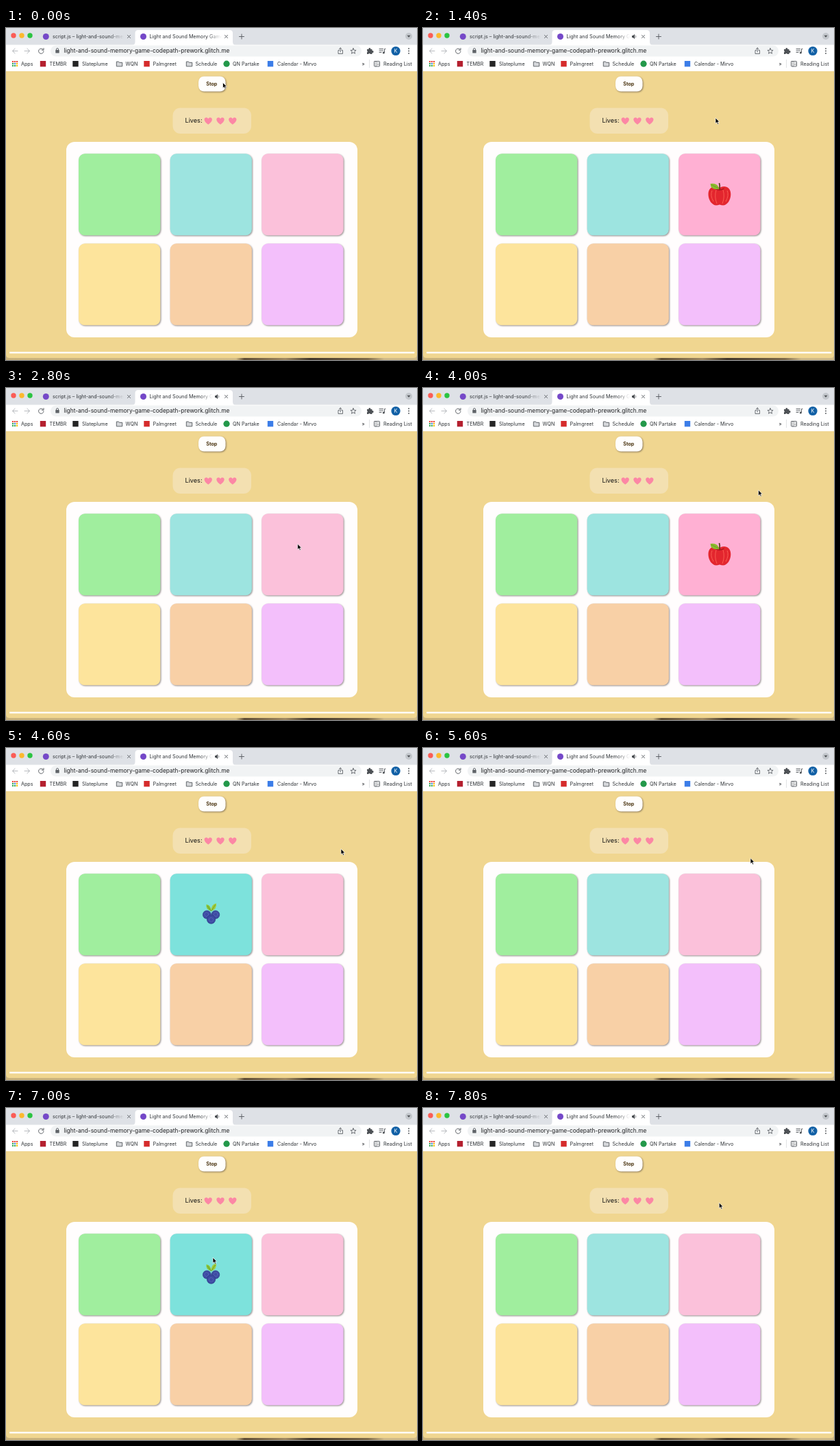
Animation, 600 px wide and 484 px high, one loop 8000 ms. Source, as an HTML page:

```html
<!DOCTYPE html>
<html lang="en">
<head>
<meta charset="utf-8">
<title>Memory game</title>
<style>
  html, body { margin: 0; width: 100%; height: 100%; overflow: hidden; background: #f0d690; }
  svg { display: block; }
  text { font-family: Inter, Roboto, sans-serif; font-size: 7.2px; fill: #2f3337; }
  .line { fill: none; stroke: #5f6368; stroke-width: 1; stroke-linecap: round; stroke-linejoin: round; }
  .shadow { filter: drop-shadow(1.2px 1.4px 1px rgba(60, 50, 50, .55)); }
</style>
</head>
<body>
<svg width="600" height="484" viewBox="0 0 600 484">
  <defs>
    <linearGradient id="fade">
      <stop offset=".8" stop-color="#fff"/><stop offset="1" stop-color="#fff" stop-opacity="0"/>
    </linearGradient>
    <linearGradient id="desk">
      <stop offset="0" stop-color="#c9b27c"/><stop offset=".56" stop-color="#d3bd88"/>
      <stop offset=".58" stop-color="#5d4c35"/><stop offset=".68" stop-color="#a18b64"/>
      <stop offset=".74" stop-color="#41372a"/><stop offset=".88" stop-color="#7d6a4b"/>
      <stop offset=".92" stop-color="#d0bb8a"/>
    </linearGradient>
    <mask id="fadeLeft"><rect x="66" width="106" height="24" fill="url(#fade)"/></mask>
    <mask id="fadeRight"><rect id="titleSpan" x="207" width="108" height="24" fill="url(#fade)"/></mask>
    <g id="close"><path class="line" d="M-2-2 2 2M2-2-2 2"/></g>
    <g id="folder"><path class="line" d="M-4.2 3.2V-3.2H-1L0-2H4.2V3.2Z" style="fill:#d5d7da"/></g>
    <path id="heart" fill="#fc87a5" d="M0 5.2C-3.2 2.7-5.7.6-5.7-2C-5.7-5.4-1.5-6.1 0-3.1C1.5-6.1 5.7-5.4 5.7-2C5.7.6 3.2 2.7 0 5.2Z"/>
  </defs>

  <!-- desktop and page -->
  <rect width="600" height="484" fill="url(#desk)"/>
  <path d="M0 62H600V476Q600 481 595 481H5Q0 481 0 476Z" fill="#f0d690"/>
  <rect x="5" y="472" width="591.5" height="2.4" rx="1" fill="#fffdf8"/>

  <!-- tab strip -->
  <rect width="600" height="25" fill="#dee1e6"/>
  <circle cx="11" cy="11" r="3.7" fill="#fb5c55"/>
  <circle cx="23" cy="11" r="3.7" fill="#fcb92d"/>
  <circle cx="35" cy="11" r="3.7" fill="#2bc440"/>
  <path d="M184 25Q188.500 25 188.500 20V7.500Q188.500 3 193 3H326.500Q331 3 331 7.500V20Q331 25 335.500 25Z" fill="#fff"/>
  <circle cx="58.300" cy="12.500" r="4.500" fill="#7548c8"/>
  <circle cx="200.500" cy="12.500" r="4.500" fill="#7548c8"/>
  <g mask="url(#fadeLeft)"><text x="68" y="15">script.js – light-and-sound-memory</text></g>
  <g mask="url(#fadeRight)"><text x="209.500" y="15">Light and Sound Memory Game</text></g>
  <g id="speaker">
    <path d="M305 11H306.700L309 9V16L306.700 14H305Z" fill="#4d5155"/>
    <path class="line" d="M310.300 11Q311.500 12.500 310.300 14" style="stroke-width:.8"/>
  </g>
  <use href="#close" x="179.500" y="12.500"/>
  <use href="#close" x="321.500" y="12.500"/>
  <path class="line" d="M340.500 12.500H347.500M344 9V16"/>
  <circle cx="588" cy="12" r="5" fill="#c3c7cc"/>
  <path d="M585.500 10.700H590.500L588 13.700Z" fill="#4d5155"/>

  <!-- toolbar -->
  <rect y="24.500" width="600" height="38.500" fill="#fff"/>
  <rect x="65" y="25.500" width="454" height="16" rx="8" fill="#f1f3f4"/>
  <path class="line" d="M17 33.500H9.500M13 30L9.500 33.500L13 37M27 33.500H34.500M31 30L34.500 33.500L31 37" style="stroke:#b9bcc0"/>
  <path class="line" d="M54.300 31.500A3.700 3.700 0 1 0 55 34M55 29.500V32.200H52.300"/>
  <rect x="72.300" y="32" width="5.400" height="4.500" rx=".6" fill="#5f6368"/>
  <path class="line" d="M73.500 32V31A1.500 1.500 0 0 1 76.500 31V32" style="stroke-width:.9"/>
  <text x="84.500" y="36.300" style="font-size:8.4px;fill:#202124">light-and-sound-memory-game-codepath-prework.glitch.me</text>
  <path class="line" d="M486.500 32.500H485V37.500H491.500V32.500H490M488.200 35V29M486.300 30.800L488.200 29L490.100 30.800" style="stroke-width:.9"/>
  <path id="star" class="line" style="stroke-width:.9"/>
  <path d="M527 31H529.400A1.500 1.500 0 1 1 532.300 31H534.500V33.200A1.500 1.500 0 1 1 534.500 36V38H531.800A1.400 1.400 0 0 0 529.200 38H527V35.600A1.500 1.500 0 0 0 527 33Z" fill="#4d5155"/>
  <path class="line" d="M545 30.500H550.500M545 33H550.500M545 35.500H548M552.500 35.500V30.500H554"/>
  <circle cx="551.300" cy="36" r="1.500" fill="#4d5155"/>
  <circle cx="569" cy="33.500" r="6.600" fill="#1261a6"/>
  <text x="569" y="36" text-anchor="middle" style="fill:#fff">K</text>
  <path d="M588 30V30M588 33.500V33.500M588 37V37" stroke="#4d5155" stroke-width="1.800" stroke-linecap="round"/>

  <!-- bookmarks -->
  <g id="bookmarks"></g>
  <path d="M530.500 46V58" stroke="#d5d7da" stroke-width=".7"/>
  <rect class="line" x="537.500" y="48.500" width="8" height="7.500" rx=".7"/>
  <path class="line" d="M540 48.500V56M542 51H544M542 53.500H544" style="stroke-width:.8"/>

  <!-- game -->
  <rect class="shadow" x="281" y="70.500" width="39.500" height="22" rx="8" fill="#fffefc"/>
  <text x="300.300" y="84.200" text-anchor="middle" style="font-weight:700;fill:#4b3511">Stop</text>
  <rect x="243.500" y="116.500" width="114.500" height="37.500" rx="11" fill="#f3e0b1"/>
  <text x="261.500" y="138.200" style="font-size:9.1px;fill:#111">Lives:</text>
  <use href="#heart" x="295.200" y="135.500"/>
  <use href="#heart" x="313" y="135.500"/>
  <use href="#heart" x="330.800" y="135.500"/>
  <rect x="88" y="166" width="425" height="285" rx="12" fill="#fffdfd"/>
  <g id="tiles"></g>

  <g id="apple">
    <path d="M433 233C427 228.500 416.500 231 416.500 242C416.500 251 422 258.500 428 258.500Q430.500 258.500 433 257.500Q435.500 258.500 438 258.500C444 258.500 449.300 251 449.300 242C449.300 231 439 228.500 433 233Z" fill="#e3262e"/>
    <path d="M422 237Q419 244 424 253M428 236Q425 246 429 256M438 236Q441 246 437 256M444 237Q447 244 442 253" fill="none" stroke="#fa5a50" stroke-width="1"/>
    <path d="M427 234.500Q433 238 439.500 234" fill="none" stroke="#9e1720" stroke-width="1.300"/>
    <path d="M433 235.500Q433.800 230 432.500 226" fill="none" stroke="#57341c" stroke-width="1.700"/>
    <path d="M432.500 234.500Q420 237 419.500 227Q430 225 432.500 234.500Z" fill="#8dbb2e"/>
    <path d="M421 228.500L431 233.500" stroke="#5d8d20" stroke-width=".7"/>
  </g>
  <g id="berries">
    <path d="M299.500 238Q291 235 292.500 228Q299.500 229 299.500 238Z" fill="#8cc63b"/>
    <path d="M299.500 238Q299 228 307 226.500Q308 235 299.500 238Z" fill="#a5cc3a"/>
    <path d="M294 230L299.500 238L305.500 228.500" fill="none" stroke="#4d8b2c" stroke-width=".7"/>
    <g fill="#3d4ba3" stroke="#2d367e" stroke-width=".6">
      <circle cx="293.300" cy="243" r="6"/><circle cx="305.800" cy="243" r="6"/><circle cx="299.500" cy="250" r="6.200"/>
    </g>
    <g fill="none" stroke="#7480c8" stroke-width=".8" stroke-dasharray="1 1">
      <circle cx="292.700" cy="242.500" r="2.800"/><circle cx="306.300" cy="242.500" r="2.800"/><circle cx="299.500" cy="250.300" r="3"/>
    </g>
  </g>
  <path id="cursor" d="M0 0V8.200L1.900 6.500L3.200 9.400L4.600 8.800L3.300 5.900H5.800Z" fill="#000" stroke="#fff" stroke-width=".7" stroke-linejoin="round"/>
</svg>

<script>
const LOOP = 8000, STEP = 200;
const $ = id => document.getElementById(id);

function add(parent, tag, attrs, content = "") {
  const el = document.createElementNS("http://www.w3.org/2000/svg", tag);
  for (const key in attrs) el.setAttribute(key, attrs[key]);
  el.textContent = content;
  parent.append(el);
  return el;
}

// Bookmark bar: label, text x, icon centre x, icon kind, colour
const bar = $("bookmarks");
[
  ["Apps", 22], ["TEMBR", 63.5, 54, "square", "#b4202f"],
  ["Slateplume", 111, 101.5, "square", "#252525"], ["WQN", 174.5, 165.5, "folder"],
  ["Palmgreet", 214.5, 205.5, "square", "#d52b2b"], ["Schedule", 276.5, 267.5, "folder"],
  ["QN Partake", 331, 322, "circle", "#23984a"],
  ["Calendar - Mirvo", 396, 386, "square", "#3c7de8"],
  ["»", 519.5], ["Reading List", 551],
].forEach(([label, x, icon, kind, fill]) => {
  add(bar, "text", { x, y: 54.8 }, label);
  if (kind === "folder") add(bar, "use", { href: "#folder", x: icon, y: 52.3 });
  if (kind === "circle") add(bar, "circle", { cx: icon, cy: 52.2, r: 4.6, fill });
  if (kind === "square") add(bar, "rect", { x: icon - 4.2, y: 48, width: 8.4, height: 8.4, fill });
});
["#e94235", "#e94235", "#e94235", "#34a853", "#4285f4", "#fbbc05", "#34a853", "#34a853", "#fbbc05"]
  .forEach((fill, i) => add(bar, "rect", {
    x: 9 + i % 3 * 3, y: 48 + Math.floor(i / 3) * 3, width: 2.1, height: 2.1, fill }));

$("star").setAttribute("d", "M" + Array.from({ length: 10 }, (_, i) => {
  const r = i % 2 ? 1.9 : 4.3, a = i * Math.PI / 5 - Math.PI / 2;
  return [507 + r * Math.cos(a), 33.8 + r * Math.sin(a)].map(n => n.toFixed(2));
}).join("L") + "Z");

const tiles = ["#a0ee9e", "#9de4e0", "#fbc1da", "#fde49c", "#f8d0a6", "#f3bffb"]
  .map((fill, i) => add($("tiles"), "rect", {
    class: "shadow", x: 106 + i % 3 * 133.6, y: i < 3 ? 183.3 : 314.3,
    width: 119.3, height: 119, rx: 9, fill }));

// Lit intervals in ms
const keys = [
  { tile: tiles[2], fruit: $("apple"), off: "#fbc1da", on: "#ffb0d3",
    lit: [[1000, 2000], [2400, 2800], [3400, 4200], [6000, 6400]] },
  { tile: tiles[1], fruit: $("berries"), off: "#9de4e0", on: "#7de2dc",
    lit: [[4400, 5200], [6800, 7200]] },
];

// Pointer path: time, x, y
const path = [
  [0, 316.5, 79.5], [400, 345, 92], [1000, 420, 128], [1400, 427, 131], [2000, 427, 150],
  [2400, 425, 226], [2800, 425.7, 227.3], [3200, 445, 200], [3600, 490, 150],
  [4600, 489, 147], [5200, 490, 148], [5600, 478, 160.5], [6000, 436, 214],
  [6200, 425, 217], [6600, 321, 215], [7000, 302, 218], [7400, 325, 205], [7800, 432.3, 138],
];

function pointerAt(t) {
  const i = path.findIndex(p => p[0] >= t);
  if (i < 1) return path[0].slice(1);
  const [a, b] = [path[i - 1], path[i]];
  const k = (t - a[0]) / (b[0] - a[0]);
  return [1, 2].map(n => a[n] + (b[n] - a[n]) * k);
}

function draw(t) {
  for (const { tile, fruit, off, on, lit } of keys) {
    const active = lit.some(([from, to]) => t >= from && t < to);
    tile.setAttribute("fill", active ? on : off);
    fruit.style.display = active ? "" : "none";
  }
  const audible = t >= 1000;
  $("speaker").style.display = audible ? "" : "none";
  $("titleSpan").setAttribute("width", audible ? 95 : 108);
  $("cursor").setAttribute("transform", `translate(${pointerAt(t)})`);
}

const start = performance.now();
function tick() {
  const t = (performance.now() - start) % LOOP;
  draw(Math.floor(t / STEP) * STEP);
  requestAnimationFrame(tick);
}
tick();
</script>
</body>
</html>
```
